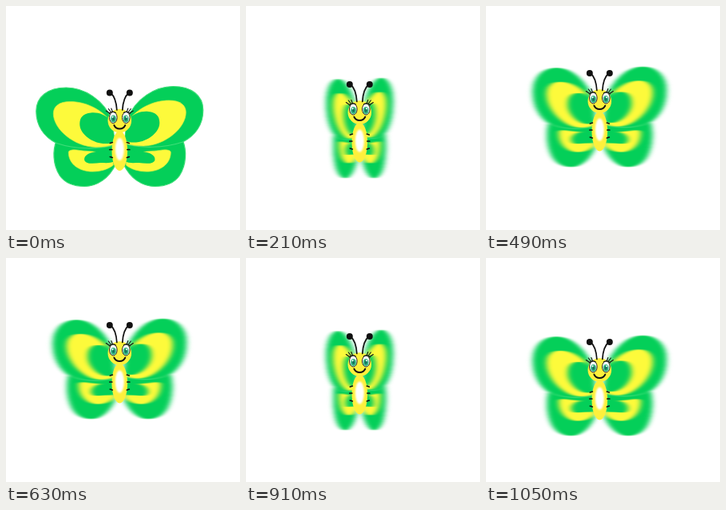
These frames come from a looping animation (293 px wide and 280 px high, 1120 ms). An HTML page:

```html
<!DOCTYPE html>
<html lang="en">
<head>
<meta charset="utf-8">
<title>Butterfly</title>
<style>
  html, body { margin: 0; width: 100%; height: 100%; overflow: hidden; background: #fff; }
  svg { display: block; width: 100vw; height: 100vh; }
  .green { fill: #04cf59; }
  .rim { stroke: #3fdd78; stroke-width: 1.2; }
  .yellow { fill: #fdfa3b; stroke: #c8ee42; stroke-width: .7; }
  .line { fill: none; stroke: #111; stroke-linecap: round; }
</style>
</head>
<body>
<svg viewBox="0 0 293 280">
  <defs>
    <filter id="soft" filterUnits="userSpaceOnUse" x="0" y="60" width="293" height="200" color-interpolation-filters="sRGB">
      <feGaussianBlur stdDeviation="3.6 0.3"/>
    </filter>
    <filter id="glow" x="-50%" y="-30%" width="200%" height="160%">
      <feGaussianBlur stdDeviation="1.2"/>
    </filter>

    <!-- Wings are drawn to the right of x = 0, the hinge -->
    <g id="lower">
      <path class="green rim" d="M4 170C30 166 60 160 79 168C84 180 84 198 75 212C68 222 56 225.5 44 225.5C28 225.5 13 215 5 198Z"/>
      <path class="yellow" d="M8 190C20 181 40 182 50 180.500C58 179 64 180 64 183C64 198 50 207 34 207C24 207 14 204 8 199Z"/>
      <path class="green" d="M6 178C20 183 28 181 34 183C42 185 45 189 44 193C42 198 32 197 24 196C18 196 12 197 6 194Z"/>
    </g>
    <g id="upper">
      <path class="green rim" d="M9 142C20 115 45 100.500 67 100.500C90 100.500 104.500 112 104.500 130C104.500 148 95 162 79 170C55 178 25 178 6 172Z"/>
      <path class="yellow" d="M10 144C22 128 42 118 62 118C76 118 83 124 83 133C83 152 58 174 30 175C22 175 14 174 6 171Z"/>
      <path class="green" d="M10 142C18 134 28 131 36 132C46 133 50 138 50 146C50 158 36 168 24 170C18 171 12 171 6 168Z"/>
    </g>

    <!-- Mirrored half of the face and body details -->
    <g id="half">
      <path class="line" stroke-width="1.700" d="M3.500 130C4 122 5 114 11 109"/>
      <circle cx="12.500" cy="108.500" r="4" fill="#111"/>
      <ellipse cx="8" cy="139.500" rx="4.800" ry="7" fill="#fff" stroke="#222" stroke-width="1"/>
      <ellipse cx="7.800" cy="141" rx="3.400" ry="4.600" fill="#35b583"/>
      <ellipse cx="7.800" cy="141" rx="1.500" ry="2.400" fill="#16705a"/>
      <circle cx="8.800" cy="138.800" r="1" fill="#fff"/>
      <path class="line" stroke-width="1.100" d="M5 133.500Q9 130.500 13 134.500M9 132L10.500 128M11 132.500L14 128.500M12.500 134L17 131"/>
      <path class="line" stroke-width="1.700" d="M9 170.500L12 171.500M9.500 179.500H12.500M9 189.500L12 188.500"/>
    </g>
  </defs>

  <g id="bug">
    <g id="wings">
      <g id="left"><use href="#lower"/><use href="#upper" y="1.500"/></g>
      <g id="right"><use href="#lower"/><use href="#upper"/></g>
    </g>
    <g transform="translate(142.300 0)">
      <ellipse cx="0" cy="181" rx="9.800" ry="25" fill="#fdf03c"/>
      <circle cx="0" cy="143.500" r="14.800" fill="#fdf03c"/>
      <ellipse cx="0" cy="179" rx="5.500" ry="14" fill="#fff" filter="url(#glow)"/>
      <use href="#half"/>
      <use href="#half" transform="scale(-1 1)"/>
      <path class="line" stroke-width="1.900" d="M-7 149Q-5 153.500 0 153.500T7 149"/>
    </g>
  </g>
</svg>
<script>
  const STEP = 70, BEAT = 8, HINGE = 142.3;
  const RISE = 3.5, FOLD = 0.2;
  const [bug, wings, left, right] = ['bug', 'wings', 'left', 'right']
    .map(id => document.getElementById(id));

  // Triangle wave: 0 up to half and back to 0 over one period
  const bounce = (n, period) => Math.min(n % period, period - n % period);

  function draw(time) {
    const n = Math.floor(time / STEP) % (2 * BEAT);
    const fold = bounce(n, BEAT);
    const width = 1 - FOLD * fold;
    bug.setAttribute('transform', `translate(0 ${-RISE * bounce(n, 2 * BEAT)})`);
    left.setAttribute('transform', `translate(${HINGE} 0) scale(${-width} 1)`);
    right.setAttribute('transform', `translate(${HINGE} 0) scale(${width} 1)`);
    wings.setAttribute('filter', fold ? 'url(#soft)' : 'none');
  }

  const start = performance.now();
  function tick() {
    draw(performance.now() - start);
    requestAnimationFrame(tick);
  }
  tick();
</script>
</body>
</html>
```
